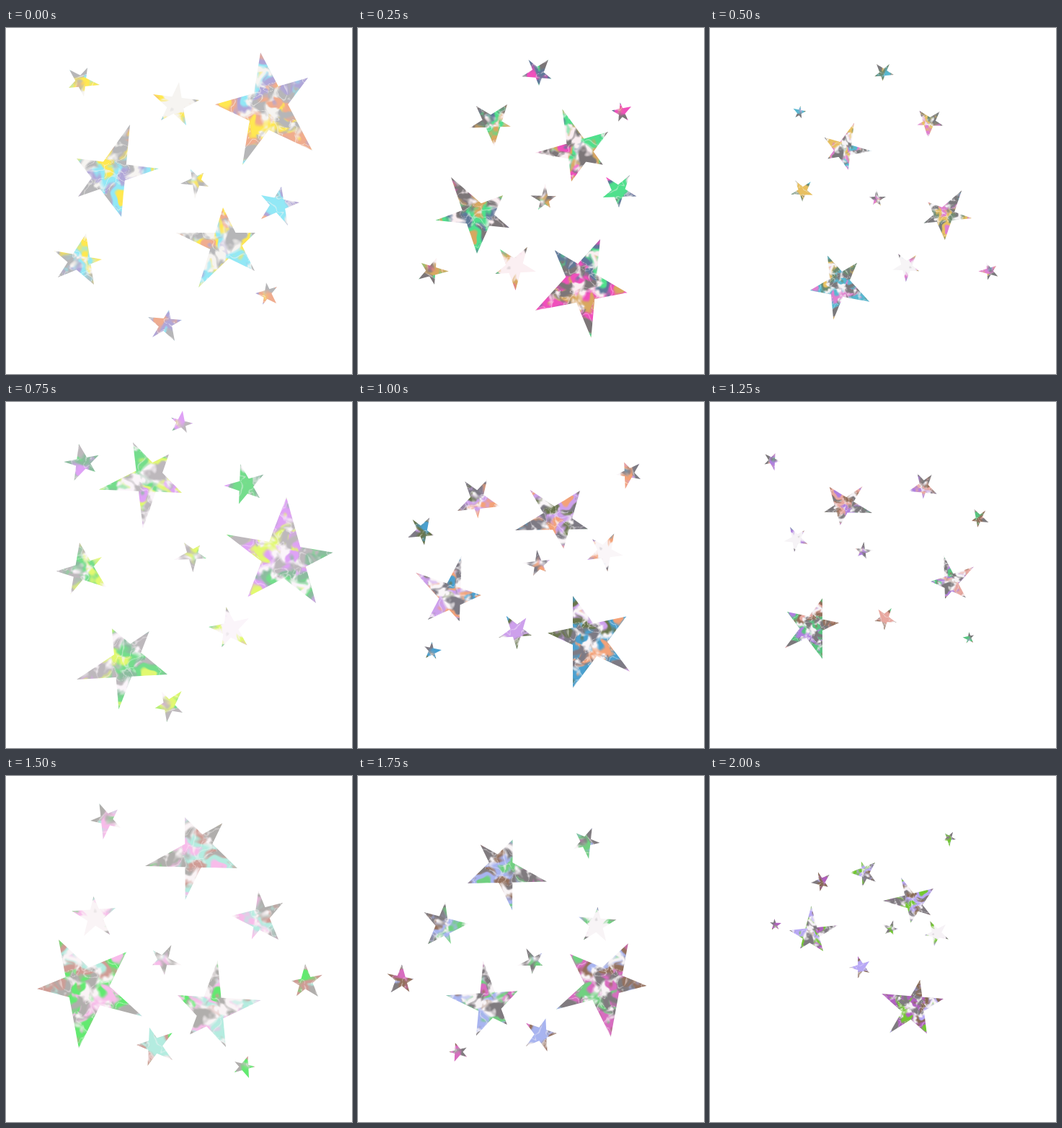
An HTML page with a canvas for the animation above (2250 ms loop, 480 by 480 pixels).

```html
<!DOCTYPE html>
<html lang="en">
<head>
<meta charset="utf-8">
<title>Foil stars</title>
<style>
html, body { margin: 0; width: 100%; height: 100%; overflow: hidden; background: #fff; }
canvas { display: block; width: 480px; height: 480px; }
</style>
</head>
<body>
<canvas id="stage" width="480" height="480"></canvas>
<script>
const start = performance.now();
const SIZE = 480, HOLD = 250;
const ctx = document.getElementById('stage').getContext('2d');

// Five tips per star, clockwise
const tips = [
  [353,34, 419,69, 425,170, 328,190, 290,106],
  [172,134, 212,195, 160,262, 100,234, 98,181],
  [301,249, 346,284, 345,337, 267,360, 236,284],
  [240,75, 268,100, 250,135, 215,128, 204,92],
  [111,285, 133,321, 122,356, 72,346, 67,309],
  [382,220, 407,242, 391,274, 354,265, 354,232],
  [226,391, 244,405, 234,434, 203,429, 197,401],
  [113,55, 130,79, 108,95, 87,83, 88,58],
  [361,353, 376,359, 375,382, 356,384, 346,368],
  [256,196, 274,201, 281,220, 262,237, 242,216]
];
// How colourful each star's foil is, and where its colour ramp begins
const vivid = [.8, .5, .5, .12, .5, .9, .85, .85, .75, .15];
const tone = [.9, 3, 2.6, 2, 2.6, .2, .3, 2.5, .4, 2];

const stars = tips.map((t, i) => {
  const pts = [0, 2, 4, 6, 8].map(k => [t[k], t[k + 1]]);
  const x = pts.reduce((s, p) => s + p[0], 0) / 5;
  const y = pts.reduce((s, p) => s + p[1], 0) / 5;
  const r = Math.max(...pts.map(p => Math.hypot(p[0] - x, p[1] - y)));
  const path = new Path2D();
  [0, 2, 4, 1, 3].forEach(k => path.lineTo(...pts[k]));
  path.closePath();
  return { pts, x, y, r, path, vivid: vivid[i], tone: tone[i] };
});

// Poses give the places of the first and third tip of every star.
// Stars with an index below `mirrored` are turned over.
function pose(places, mirrored) {
  return stars.map((s, i) => {
    const [px, py, qx, qy] = places.slice(i * 4, i * 4 + 4);
    const [[x0, y0], , [x2, y2]] = s.pts;
    const m = i < mirrored ? -1 : 1;
    const dx = x2 - x0, dy = m * (y2 - y0), ex = qx - px, ey = qy - py;
    const n = dx * dx + dy * dy;
    const u = (ex * dx + ey * dy) / n, v = (ey * dx - ex * dy) / n;
    const c = -m * v, d = m * u;
    return [u, v, c, d, px - u * x0 - c * y0, py - v * x0 - d * y0];
  });
}

// Turns each star over about its own centre, resizes it and moves it
function reflect(from, k, moveX, moveY) {
  return from.map(([a, b, c, d, e, f], i) => {
    const s = stars[i];
    const x = a * s.x + c * s.y + e, y = b * s.x + d * s.y + f;
    return [-k * a, k * b, -k * c, k * d, moveX(x) - k * (e - x), moveY(y) + k * (f - y)];
  });
}

const burst1 = stars.map(() => [1, 0, 0, 1, 0, 0]);
const burst1Mid = pose([
  336,293,246,392, 129,207,165,313, 296,213,347,144, 247,338,197,307, 189,164,207,106,
  362,249,377,204, 251,80,264,44, 106,356,109,319, 361,130,379,109, 250,252,275,233
], 10);
const burst2 = pose([
  430,279,389,132, 98,385,224,378, 244,126,176,56, 337,300,281,312, 139,257,102,195,
  352,133,325,86, 124,97,101,58, 245,431,216,402, 251,43,245,12, 278,217,247,195
], 10);
const burst2Mid = pose([
  298,269,298,397, 218,178,308,123, 171,268,97,302, 368,213,318,219, 197,145,138,151,
  241,324,195,327, 105,185,69,188, 392,107,358,101, 92,339,116,344, 266,219,243,241
], 1);
const burst3 = pose([
  73,227,101,378, 193,125,321,128, 238,304,305,376, 108,222,152,183, 313,194,378,227,
  181,373,231,394, 396,284,433,306, 117,62,159,72, 317,396,337,419, 204,242,220,276
], 10);
const burst3End = pose([
  324,309,238,302, 240,173,310,156, 157,243,110,214, 327,206,311,236, 194,134,229,120,
  221,273,193,266, 164,154,140,148, 341,88,323,90, 83,203,99,204, 261,212,243,219
], 1);

// Palette order: grey, white, then the four colours of the ramp
const steps = [
  [burst1, 'b6b6b8 f6f4f1 b0a6d8 f0ac8e ffe850 92e8f6'],
  [burst1Mid, '7c7678 fbeff2 5f7899 f04fbc d8a860 4fe08c'],
  [reflect(burst1Mid, .65, x => 490 - x, y => y), '7a797c f6f4f6 6c8a70 58b8d0 e080d0 e8c060'],
  [burst2, 'bdb8bc fbf5fa 8cbc9f dfa2f6 e2f970 74dd8c'],
  [burst2Mid, '7d7a84 faf6f8 68754c 4aa0d0 f4a278 cda0ec'],
  [reflect(burst2Mid, .66, x => 462 - x, y => y - 18), '7c797c f6f3f6 94705c 58c480 b080e0 e8a8a0'],
  [burst3, 'b0aeac faf4f6 cf9c95 62ea70 f8bcea b4ece0'],
  [reflect(burst3, .86, x => 445 - .925 * x, y => 40 + .85 * y), '807b7f f8f4f6 94705c d86cc0 70d080 a8b4f0'],
  [burst3End, '7f7a80 f6f2f6 866a54 b060c0 72c830 b8a8f6']
];

const clamp = v => Math.min(1, Math.max(0, v));
const ease = v => v * v * (3 - 2 * v);

function hash(x, y) {
  const h = Math.sin(x * 127.1 + y * 311.7) * 43758.5453;
  return h - Math.floor(h);
}

function noise(x, y) {
  const i = Math.floor(x), j = Math.floor(y);
  const u = ease(x - i), v = ease(y - j);
  const top = hash(i, j) * (1 - u) + hash(i + 1, j) * u;
  const low = hash(i, j + 1) * (1 - u) + hash(i + 1, j + 1) * u;
  return top * (1 - v) + low * v;
}

const cloud = (x, y) =>
  noise(x, y) * .55 + noise(x * 2.1 + 7, y * 2.1) * .3 + noise(x * 4.3, y * 4.3 + 5) * .15;

// Crumpled foil around the stars: palette weights for each pixel
const foil = [];
for (let y = 0; y < SIZE; y++) {
  for (let x = 0; x < SIZE; x++) {
    let near = null, best = 1.1;
    for (const s of stars) {
      const d = Math.hypot(x - s.x, y - s.y) / s.r;
      if (d < best) { best = d; near = s; }
    }
    if (!near) continue;
    const wx = x + 10 * noise(x / 15, y / 15), wy = y + 10 * noise(x / 15 + 40, y / 15);
    const crease = Math.abs(cloud(wx / 22 + 90, wy / 22) - .5);
    const pos = near.tone + 5 * (cloud(wx / 24, wy / 34) - .5) + (y - near.y) * .012 + 8;
    const part = pos % 1;
    foil.push({
      at: (y * SIZE + x) * 4,
      white: clamp((cloud(wx / 17 + 30, wy / 24) - .5) * 7 + .45),
      colour: clamp((cloud(wx / 20 + 60, wy / 16) - .5) * 6 + near.vivid),
      band: Math.floor(pos) % 4,
      blend: ease(clamp((part - .4) / .6)),
      shine: .6 * clamp(1 - crease / .025)
    });
  }
}

function paintFoil(palette) {
  const cols = palette.split(' ').map(h => [0, 2, 4].map(k => parseInt(h.slice(k, k + 2), 16)));
  const [grey, white, ...ramp] = cols;
  const sheet = document.createElement('canvas');
  sheet.width = sheet.height = SIZE;
  const g = sheet.getContext('2d');
  const img = g.createImageData(SIZE, SIZE);
  const mix = (a, b, t) => a + (b - a) * t;
  for (const p of foil) {
    const one = ramp[p.band], two = ramp[(p.band + 1) % 4];
    for (let k = 0; k < 3; k++) {
      const plain = mix(grey[k], white[k], p.white);
      const tint = mix(one[k], two[k], p.blend);
      img.data[p.at + k] = mix(mix(plain, tint, p.colour), white[k], p.shine);
    }
    img.data[p.at + 3] = 255;
  }
  g.putImageData(img, 0, 0);
  return sheet;
}

const sheets = steps.map(s => paintFoil(s[1]));

function draw(n) {
  ctx.setTransform(1, 0, 0, 1, 0, 0);
  ctx.fillStyle = '#fff';
  ctx.fillRect(0, 0, SIZE, SIZE);
  stars.forEach((s, i) => {
    ctx.save();
    ctx.setTransform(...steps[n][0][i]);
    ctx.clip(s.path);
    ctx.drawImage(sheets[n], 0, 0);
    ctx.restore();
  });
}

let shown = -1;
function tick() {
  const n = Math.floor((performance.now() - start) / HOLD) % steps.length;
  if (n !== shown) draw(shown = n);
  requestAnimationFrame(tick);
}
tick();
</script>
</body>
</html>
```
